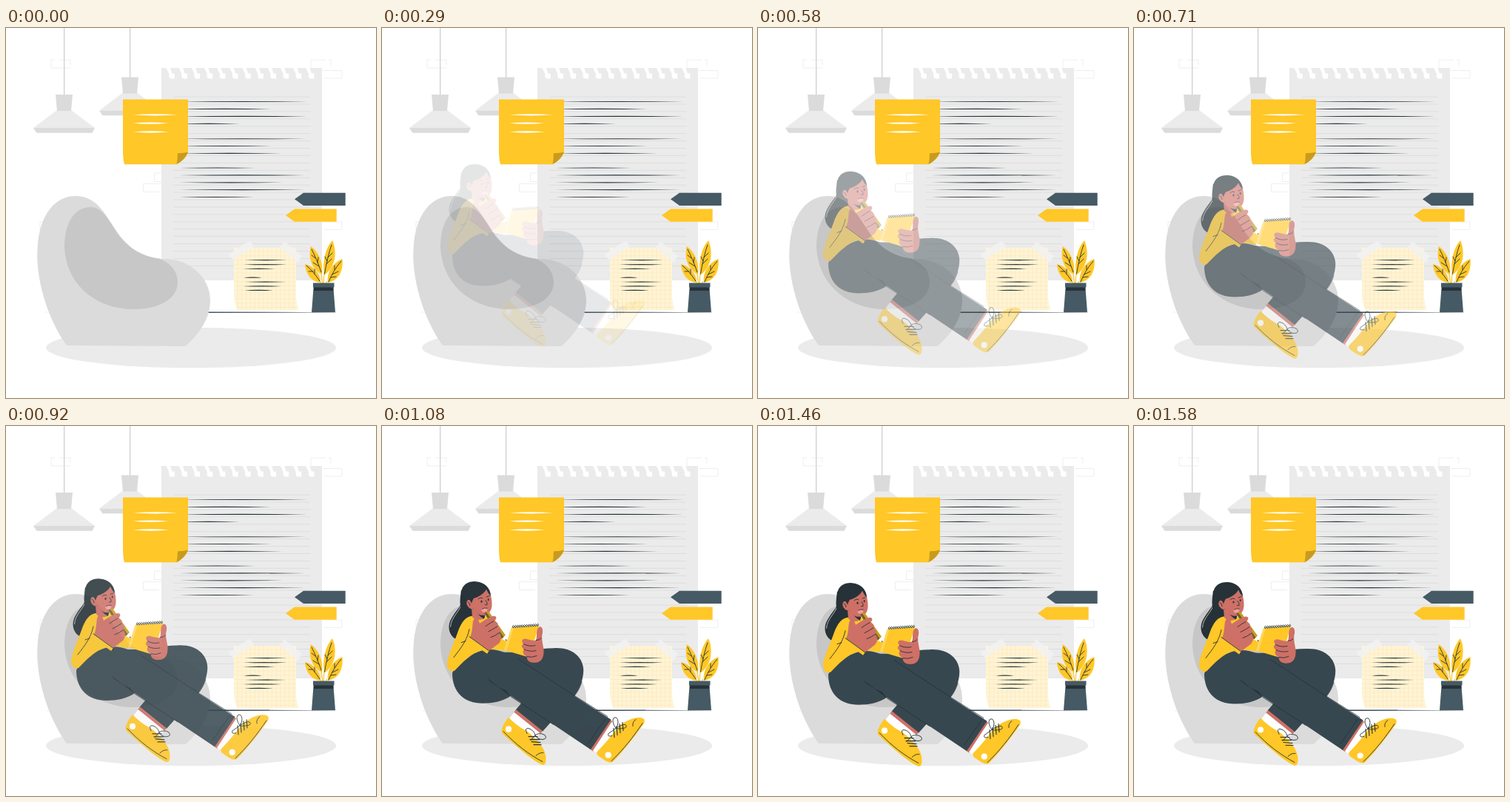
An HTML page for the animation above (1.62 s loop, 500 px wide and 500 px high).

```html
<!DOCTYPE html>
<html lang="en">
<head>
<meta charset="utf-8">
<title>Reading corner</title>
<style>
html, body { margin: 0; width: 100%; height: 100%; overflow: hidden; background: #fff; }
svg { display: block; width: 100vw; height: 100vh; }
.ink { fill: none; stroke: #263238; stroke-width: .9; stroke-linecap: round; stroke-linejoin: round; }
.brick { fill: none; stroke: #ebebeb; stroke-width: .8; }
</style>
</head>
<body>
<svg viewBox="0 0 500 500">
  <defs>
    <g id="lamp">
      <path d="M78.7 0V92" stroke="#c7c7c7" stroke-width="1.1"/>
      <path d="M69 111H88L120 135H37Z" fill="#ebebeb"/>
      <path d="M67 90H90L88 112H69Z" fill="#dbdbdb"/>
      <path d="M37 135H120L116.500 141.800H41.500Z" fill="#dbdbdb"/>
    </g>
  </defs>

  <ellipse cx="250" cy="432" rx="196" ry="27.300" fill="#ebebeb"/>
  <g class="brick">
    <path d="M66 43H61V54H87M72 43H87V50"/>
    <path d="M412 54V43H432M436 43H439V51"/>
    <path d="M428 57.500H454V68H430"/>
    <path d="M212 196H200.500V207.500H212"/>
    <path d="M212 210.500H185.500V221.500H207"/>
    <path d="M60 262H46V273H56"/>
    <path d="M428 262H454V272.500H430"/>
  </g>
  <path d="M50 384.200Q250 382.600 450 384.200Q250 385.600 50 384.200Z" fill="#37474f"/>

  <use href="#lamp" x="89" y="-23.500"/>
  <use href="#lamp"/>

  <path d="M210 54H427V341H210Z" fill="#ebebeb"/>
  <g id="holes" fill="#fff"></g>
  <g id="rules" stroke="#dbdbdb" stroke-width=".8"></g>
  <g id="script" fill="#263238"></g>

  <path d="M158 96.500H246V168Q243 178 230 184.300H160Q158 177 158 166Z" fill="#ffc727"/>
  <path d="M232 169.300Q240 169.500 246 167.500Q242 178 230.500 184.300Q232 177 232 169.300Z" fill="#c79b1e"/>
  <g id="memo" fill="#fff"></g>

  <path d="M390 231.200L402 222.700H458.700V240H402Z" fill="#455a64"/>
  <path d="M378 253.200L390 244.500H446.700V261.800H390Z" fill="#ffc727"/>

  <path d="M308 297H392V362Q392 373 396 381H313Q308 372 308 360Z" fill="#fff4d6"/>
  <g id="grid" stroke="#f8e6b4" stroke-width=".6"></g>
  <g id="jot" fill="#263238"></g>
  <path d="M300.500 306L329 287.500L335.500 295L306.500 313.500ZM376 288L400 308L394 317L370 296.500Z" fill="#f3f3f3" opacity=".85"/>

  <g fill="#ffc727">
    <path d="M430 334C427 315 432 297 441 287C447 300 447 322 430 334Z"/>
    <path d="M427 333C413 326 408 310 412 295C423 303 429 318 427 333Z"/>
    <path d="M425 344C412 343 405 332 404 319C416 322 425 332 425 344Z"/>
    <path d="M435 344C433 330 442 317 454.500 312C456 328 450 341 435 344Z"/>
    <path d="M430 331L429 346M426 331L428 346M434 342L432 346M424 342L427 346" stroke="#ffc727" stroke-width="1.200"/>
  </g>
  <g class="ink" stroke-width=".7">
    <path d="M430.500 332C433 318 436 304 440 293M433 319L440 312M435 310L441 304M434 315L431 309"/>
    <path d="M426 330C422 318 417 307 413 299M421 317L422 310M418 311L413 307M423 322L415 317"/>
    <path d="M424 342C419 334 412 326 406 321M417 332L417 326M415 329L409 329"/>
    <path d="M436 343C440 333 446 323 453 315M441 333L449 329M444 327L444 321M439 337L446 336"/>
  </g>
  <path d="M415.700 349H442.300L445 384.300H413Z" fill="#455a64"/>
  <path d="M415 344.500H443.500V350.500H415Z" fill="#455a64"/>
  <path d="M416 350.500H442.300V355H416Z" fill="#263238"/>

  <path d="M82 429C54 390 40 335 42.500 298C45 250 68 227 94 227C122 227 133 250 147 271C163 295 180 309 210 312C245 310 276 335 276 368C276 392 262 412 243 430Z" fill="#dbdbdb"/>
  <path d="M113 242C131 241 140 262 153 281C166 298 185 309 208 312C222 318 232 328 232 344C231 368 205 380 172 380C125 380 82 350 79 297C79 262 93 243 113 242Z" fill="#c7c7c7"/>

  <g id="girl" opacity="0">
    <!-- back hair -->
    <path d="M107 222C105 231 109 237 105 244C99 253 91 261 90.500 271C90 282 98 291 109 290C118 287 126 270 130 256L122 226Z" fill="#263238"/>
    <path d="M108 238C107 250 93 258 92.500 272" fill="none" stroke="#dbdbdb" stroke-width=".8"/>

    <!-- far leg -->
    <path d="M150 305C185 309 203 301 232 300.500C257 299 272 313 272.300 330C272 344 267 356 260 365L217 413L180.500 384L205 355Z" fill="#37474f"/>
    <!-- far foot -->
    <path d="M181 383.500L217 412.500L213 417L177.500 388Z" fill="#ce7066"/>
    <path d="M178.500 387L214 415.500L205 426L171 397Z" fill="#fff"/>
    <path d="M171 394C177 400 185 407 193 411C200 415 205 420 211 427C217 433 222 442 221.500 451C221.500 457 219 459.500 215 457.500C203 452 179 431 163 416C159 412 165 401 171 394Z" fill="#ffc727"/>
    <circle cx="171" cy="410" r="4.100" fill="#fff"/>
    <g class="ink">
      <path d="M164 413C180 430 198 444 217 454M208 446Q213 441 218 442"/>
      <path d="M196 416Q192 408 198 409Q205 411 207 418Q213 414 220 418Q224 423 217 424Q210 424 207 418L201 425"/>
      <path d="M198 420L210 420M200 424L213 424M202 427L214 428M205 431L215 431" stroke-width="1.100"/>
    </g>

    <!-- near foot -->
    <path d="M308 396L311.500 400L285.500 440L281 437Z" fill="#ce7066"/>
    <path d="M310.500 400L320 407L296 445L285 439Z" fill="#fff"/>
    <path d="M292 439C300 431 308 421 315 412C321 404 333 396 344 394.500C352 393.500 357 396 354 402C344 417 325 441 313 453C309 457 304 454 298 450C291 446 288 443 292 439Z" fill="#ffc727"/>
    <circle cx="305.700" cy="445" r="4.100" fill="#fff"/>
    <g class="ink">
      <path d="M310 453C326 438 340 420 352 402M339 406Q338 400 343 397"/>
      <path d="M316 409Q310 400 313 395Q318 392 319 400Q319 406 316 409Q324 403 329 404Q333 408 325 409Q319 410 316 409L306 416Q304 421 311 419"/>
      <path d="M313 409L314 421M317 406L318 418M321 403L322 415M325 401L326 412" stroke-width="1.100"/>
    </g>

    <!-- near leg -->
    <path d="M95 334C101 322 117 309 134 304C152 299 170 306 190 320L309.500 397L282 437.500L174 365C164 372 150 375 136 375C111 375 95 360 95 334Z" fill="#37474f"/>
    <path d="M142 341C149 350 160 354 168 358L174 366Z" fill="#263238"/>
    <g class="ink">
      <path d="M184 315L262 366L305 393" stroke-width=".8"/>
      <path d="M174 366L232 404M302 396L279 429" stroke-width=".8"/>
      <path d="M260 365Q267 357 270 346" stroke-width=".6"/>
    </g>

    <!-- shirt -->
    <path d="M121 257C113 258 107 266 103 277C98 292 91 305 88 320C87 328 92 333 98 331C109 320 120 307 136 303C148 300 160 304 165 304L169 290C162 280 154 266 147 257Z" fill="#ffc727"/>
    <path class="ink" d="M118 275C115 290 107 300 97 313M107 293L113 291M116 288L145 307M121 283L119 288"/>

    <!-- neck and face -->
    <path d="M121 247L139 252L137 261Q127 265 122 258Z" fill="#ce7066"/>
    <path d="M126 250Q133 257 140 254L138 261Q132 258 126 250Z" fill="#263238"/>
    <path d="M119 235C114 234 113 240 116 244C118 247 121 248 123 247C126 253 132 257 138 256C145 255 148 249 148.500 243C149 235 147 226 143 220H126Z" fill="#ce7066"/>
    <path d="M107 226C108 214 117 210 127 210.500C138 211 147 219 147 230Q143 226 141 221C137 228 129 232 124 233Q122 236 121 240Q118 232 114 237C113 245 115 249 117 254L107 250Q104 236 107 226Z" fill="#263238"/>
    <ellipse cx="138.500" cy="249" rx="4" ry="3" fill="#f59a9a" transform="rotate(-15 138.500 249)"/>
    <path class="ink" d="M130 234Q133 231 136 233M141 231.500L145 230M140 236Q143 239 142 242L139.500 242M135.500 247.500Q138 245.500 142 246.500M116 238Q119 239 119 243"/>
    <ellipse cx="134.500" cy="237.500" rx="1.100" ry="1.600" fill="#263238"/>
    <ellipse cx="143.700" cy="235" rx="1" ry="1.600" fill="#263238"/>

    <!-- pencil -->
    <path d="M138 253L144 250.500L167 283L162 288Z" fill="#c79b1e"/>
    <path d="M138 253L141 251.800L164.500 285.500L162 288Z" fill="#263238" opacity=".55"/>
    <path d="M162 288L167 283L168.500 291.500Z" fill="#fff"/>
    <path d="M166.500 289L168 288.500L168.500 291.500Z" fill="#263238"/>

    <!-- writing hand -->
    <path d="M122.500 268C123 262 125 259 128 260C130 261 131 264 132 267C138 263 145 258 151 257C156 257 155 262 151 264C156 265 158 268 156 271C160 273 161 277 158 280C162 283 162 289 158 294L142 306L119 287C121 281 122 275 122.500 268Z" fill="#ce7066"/>
    <path class="ink" d="M151 264Q145 267 140 271M156 271Q150 275 144 278M158 280Q153 284 147 286" stroke-width=".7"/>
    <path d="M117 284L145 304L142 308L114 288Z" fill="#ffc727"/>
    <path class="ink" d="M118 285L145 304.500" stroke-width=".7"/>

    <!-- notepad and hand -->
    <path d="M175 272.500L212 270L199 313L165 303Z" fill="#ffc727"/>
    <path d="M175 272.500L165 303L168 304L178 272.500Z" fill="#ffd65c"/>
    <g id="coil" class="ink" stroke-width=".8"></g>
    <path d="M211 273C215 269 218 274 217 280C215 286 217 293 218.500 302C219 313 216 319 208 320C200 321 195 317 196 312C191 310 189 305 192 302C187 299 189 295 191.500 295C187 291 190 287 195 288C200 289 205 291 208 290C210 284 208 277 211 273Z" fill="#ce7066"/>
    <path class="ink" d="M191.500 295Q199 299 207 297M192 302Q199 306 208 304M196 312Q202 314 209 311M208 290Q213 290 215 287" stroke-width=".7"/>
  </g>
</svg>
<script>
const LOOP = 1620, SHOW_AT = 130, DROP = 30;
const $ = id => document.getElementById(id);
const repeat = (n, draw) => Array.from({ length: n }, (_, i) => draw(i)).join("");
const path = d => `<path d="${d}"/>`;

// A pen stroke that thins out to both ends
const stroke = (y, x1, x2, h) => {
  const mid = (x1 + x2) / 2;
  return path(`M${x1} ${y}Q${mid} ${y - h} ${x2} ${y}Q${mid} ${y + h} ${x1} ${y}Z`);
};
const strokes = (id, h, rows) => {
  $(id).innerHTML = rows.map(([y, x1, x2]) => stroke(y, x1, x2, h)).join("");
};

$("holes").innerHTML = repeat(12, i => {
  const x = 224.3 + i * 17.15;
  return path(`M${x - 8} 53.5L${x - 4} 62Q${x - 5} 68.500 ${x - 1} 68.500H${x + 3.5}V61.500H${x}L${x - 2.500} 53.500Z`);
});
$("rules").innerHTML = repeat(24, i => path(`M226 ${93 + i * 9.93}H411.500`));
$("grid").innerHTML =
  repeat(14, i => path(`M${313 + i * 5.8} 297V381`)) +
  repeat(14, i => path(`M${i < 12 ? 308 : 311} ${302 + i * 5.8}H392`));
$("coil").innerHTML = repeat(12, i => {
  const x = 177 + i * 3, y = 273 - i * .2;
  return path(`M${x} ${y}q-1.500 -3 .5 -3.200q2 .5 .3 3`);
});

strokes("script", 1.15, [
  [99.5, 232, 408], [109.4, 232, 358], [119.4, 232, 407], [129.3, 232, 316],
  [149.7, 232, 405], [159.5, 232, 359], [169.3, 232, 373],
  [189, 234, 337], [198.9, 234, 404], [208.8, 234, 374], [218.6, 234, 404], [228.5, 234, 335]
]);
strokes("memo", 2.3, [[117.3, 172, 231], [128.7, 172, 219], [140.5, 172, 220]]);
strokes("jot", 1.2, [
  [313.6, 322, 380], [319.7, 321, 379], [325.3, 320, 364], [337.2, 321, 346],
  [343.1, 323, 378], [348.9, 320, 372], [354.4, 322, 361]
]);

const bezier = (s, a, b) => 3 * (1 - s) ** 2 * s * a + 3 * (1 - s) * s * s * b + s ** 3;

// cubic-bezier(.36, -.01, .5, 1.38)
function ease(p) {
  let lo = 0, hi = 1;
  for (let i = 0; i < 24; i++) {
    const mid = (lo + hi) / 2;
    if (bezier(mid, .36, .5) < p) lo = mid; else hi = mid;
  }
  return bezier(lo, -.01, 1.38);
}

const girl = $("girl");
function update(t) {
  const k = ease(t / LOOP);
  girl.setAttribute("opacity", t < SHOW_AT ? 0 : Math.min(1, Math.max(0, k)));
  girl.setAttribute("transform", `translate(0 ${DROP * (k - 1)})`);
}

const start = performance.now();
function tick() {
  update((performance.now() - start) % LOOP);
  requestAnimationFrame(tick);
}
tick();
</script>
</body>
</html>
```
